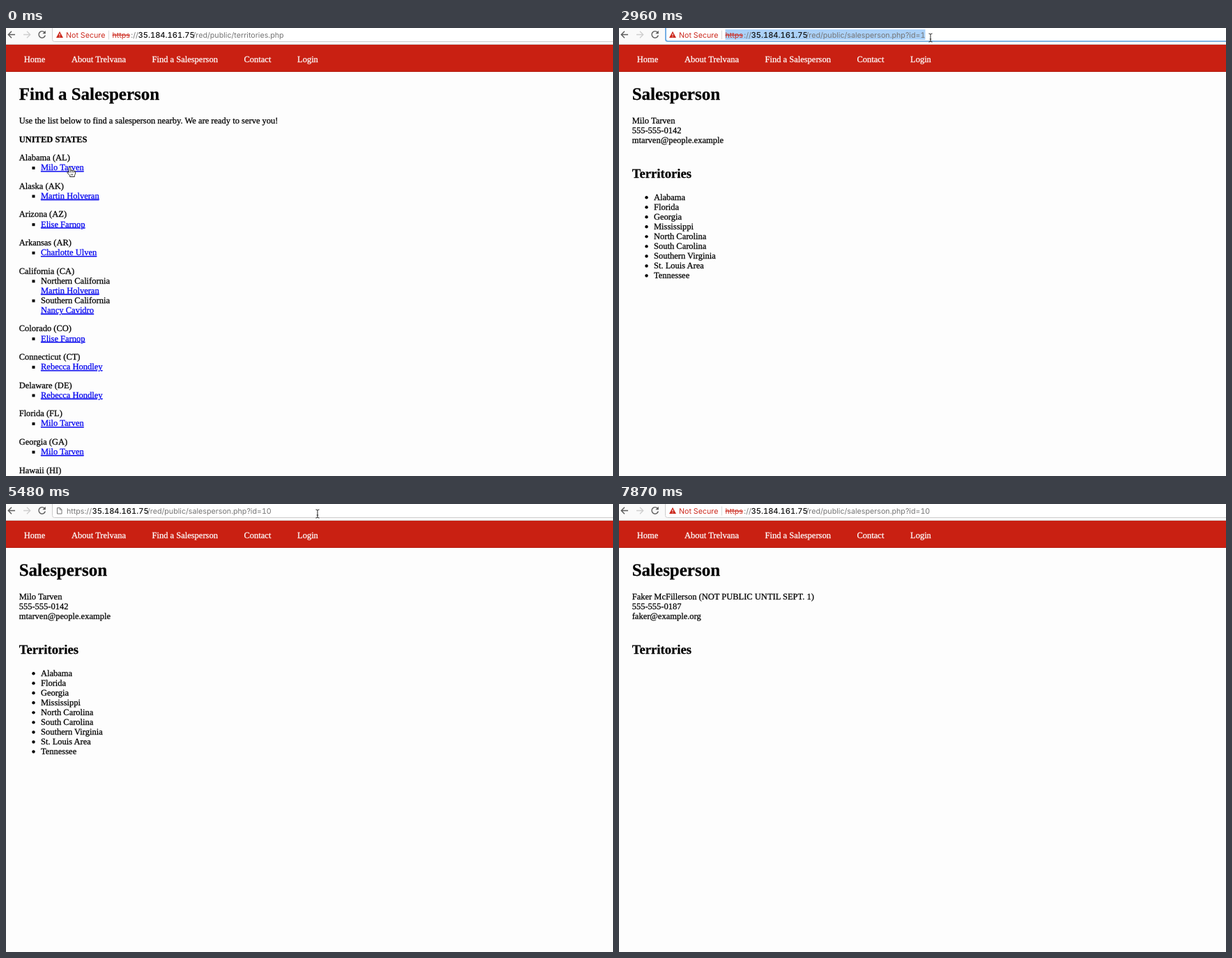
These frames come from a looping animation (871 px wide and 643 px high, 9.4 s). An HTML page:

```html
<!DOCTYPE html>
<html lang="en">
<head>
<meta charset="utf-8">
<title>Find a Salesperson</title>
<style>
  html, body { margin: 0; width: 100%; height: 100%; overflow: hidden; background: #fdfdfd; }
  svg { display: block; }
  text { white-space: pre; text-rendering: geometricPrecision; }
  .page text { font: 12.5px "Liberation Serif", "Times New Roman", serif; stroke: #000; stroke-width: .25; }
  .page .h1 { font-size: 25px; font-weight: bold; }
  .page .h2 { font-size: 18.7px; font-weight: bold; }
  .page .strong { font-weight: bold; }
  .page .link { fill: #0000ee; stroke: #0000ee; text-decoration: underline; }
  .page .nav { fill: #fff; stroke: #fff; }
  .bar text { font: 10.7px Inter, sans-serif; font-feature-settings: "tnum"; fill: #747474; }
  .bar .host { font-size: 11.15px; font-weight: 500; fill: #111; }
  .bar .bad { fill: #cc2a1e; }
  .bar .struck { text-decoration: line-through; }
  .bar .match { font-size: 11.28px; font-weight: 700; fill: #2b5fd9; }
  .bar .dark { font-size: 10.8px; fill: #111; }
</style>
</head>
<body>
<svg id="stage" width="871" height="643" viewBox="0 0 871 643">
  <defs>
    <g id="sheet" fill="#fff" stroke="#757575">
      <path d="M73.5 5.5h4l2.5 2.5v6h-6.5zM77.3 5.5v2.7H80"/>
    </g>
  </defs>

  <rect width="871" height="643" fill="#fdfdfd"/>
  <g class="page">
    <rect y="24" width="871" height="39" fill="#c92012"/>
    <rect y="62" width="871" height="1" fill="#b31c10"/>
    <g id="nav"></g>
    <g id="list"></g>
    <g id="first"></g>
    <g id="second"></g>
  </g>

  <g class="bar">
    <rect width="871" height="24" fill="#fafafa"/>
    <rect y="23" width="871" height="1" fill="#d2d2d2"/>
    <g fill="none" stroke-width="1.4">
      <path d="M13 9.5H3.5M8 4.8 3.3 9.5 8 14.2" stroke="#5c5c5c"/>
      <path d="M25 9.5h9.5M30 4.8l4.7 4.7-4.7 4.7" stroke="#cfcfcf"/>
      <path d="M55.3 6.3A4.7 4.7 0 1 0 56.3 10.5" stroke="#5c5c5c"/>
      <path d="M56.8 3.8v4.4h-4.4z" fill="#5c5c5c"/>
    </g>
    <rect x="66.5" y="-5" width="820" height="24.5" rx="3" fill="#fff" stroke="#cdcdcd"/>
    <rect id="ring" x="67" y="-5" width="820" height="24" rx="3" fill="none" stroke="#62a5e4" stroke-width="1.7"/>
    <rect id="selection" x="152.5" y="2" width="287" height="15" fill="#abd1f8"/>

    <g id="secure">
      <path d="M77 4.7 82 14H72z" fill="#cc2a1e"/>
      <path d="M77 8v3M77 12v1" stroke="#fff"/>
      <svg id="chip" x="86" width="58" height="22">
        <text class="bad" y="13.6">Not Secure</text>
      </svg>
      <g id="address">
        <path d="M147.5 3.5v13" stroke="#d8d8d8"/>
        <text class="bad struck" x="152.5" y="13.6">https</text>
        <text x="179.3" y="13.6">://</text>
        <text class="host" x="189.5" y="13.6">35.184.161.75</text>
        <text id="path" x="268.5" y="13.6"></text>
      </g>
    </g>

    <g id="editing">
      <use href="#sheet"/>
      <text x="87" y="13.6">https://</text>
      <text class="host" x="123.5" y="13.6">35.184.161.75</text>
      <text x="203" y="13.6">/red/public/salesperson.php?id=10</text>
    </g>

    <g id="dropdown">
      <rect y="23" width="871" height="49" fill="#fdfdfd"/>
      <path d="M0 23.5h871" stroke="#dcdcdc"/>
      <rect y="28" width="871" height="19" fill="#e8e8e8"/>
      <path d="M0 71.5h871" stroke="#d9d9d9"/>
      <use href="#sheet" y="28"/>
      <text class="match" x="87" y="41.6">https://35.184.161.75/red/public/salesperson.php?id=10</text>
      <text x="408.5" y="41.6">- Salesperson: Faker McFillerson (NOT PUBLIC UNTIL SEPT. 1)</text>
      <path d="M78.3 58.8 81.5 62" stroke="#707070" stroke-width="1.5"/>
      <circle cx="75.8" cy="56.2" r="3.2" fill="none" stroke="#707070" stroke-width="1.2"/>
      <text class="dark" x="87" y="61.4">https://35.184.161.75/red/public/salesperson.php?id=10</text>
      <text x="384.5" y="61.4">- Qondra Search</text>
    </g>
    <rect id="caret" y="3" width="1" height="14" fill="#111"/>
  </g>

  <g id="pointer">
    <path id="arrow" d="M0 0v11.4l2.6-2.3 1.9 4.2 2-.9-1.9-4.1h3.6z" fill="#000" stroke="#fff" stroke-width=".9"/>
    <path id="beam" d="M-2.5-6Q0-6 0-4.5Q0-6 2.5-6M0-4.5v9M-2.5 6Q0 6 0 4.5Q0 6 2.5 6M-1.2 2h2.4" fill="none" stroke="#222"/>
    <path id="hand" d="M-1.3 8V1.2Q0-.7 1.3 1.2V5Q2.8 3.8 3.7 5.3Q5 4.3 6 5.8Q8.2 5 8.2 7.5Q8.2 10.5 6.8 12V14H.2V12.3Q-2.8 9.7-3.8 7.3Q-2.8 5.6-1.3 8zM1.3 5v3M3.7 5.3V8M6 5.8V8M2 10v2M4 10v2" fill="#fff" stroke="#111" stroke-width=".9"/>
  </g>
</svg>

<script>
const LOOP = 9400, LINE = 14.04, GAP = 12.55;
const byId = id => document.getElementById(id);

function add(parent, tag, attrs, content = "") {
  const node = document.createElementNS("http://www.w3.org/2000/svg", tag);
  for (const key in attrs) node.setAttribute(key, attrs[key]);
  node.textContent = content;
  byId(parent).append(node);
}
const write = (parent, x, y, content, style = "") =>
  add(parent, "text", { x, y, class: style }, content);

const menu = { 25.7: "Home", 94: "About Trelvana", 209.5: "Find a Salesperson", 341.5: "Contact", 418: "Login" };
for (const x in menu) write("nav", x, 48.8, menu[x], "nav");

const [milo, martin, elise, rebecca] = ["Milo Tarven", "Martin Holveran", "Elise Farnop", "Rebecca Hondley"];
const states = [
  ["Alabama (AL)", [milo]],
  ["Alaska (AK)", [martin]],
  ["Arizona (AZ)", [elise]],
  ["Arkansas (AR)", ["Charlotte Ulven"]],
  ["California (CA)", [martin, "Northern California"], ["Nancy Cavidro", "Southern California"]],
  ["Colorado (CO)", [elise]],
  ["Connecticut (CT)", [rebecca]],
  ["Delaware (DE)", [rebecca]],
  ["Florida (FL)", [milo]],
  ["Georgia (GA)", [milo]],
  ["Hawaii (HI)"]
];

function buildList() {
  write("list", 18.7, 102.6, "Find a Salesperson", "h1");
  write("list", 18.7, 137, "Use the list below to find a salesperson nearby. We are ready to serve you!");
  write("list", 18.7, 163.5, "UNITED STATES", "strong");
  let y = 190.2;
  for (const [state, ...entries] of states) {
    write("list", 18.7, y, state);
    for (const [person, region] of entries) {
      y += LINE;
      add("list", "rect", { x: 37.5, y: y - 5.3, width: 4, height: 4 });
      if (region) {
        write("list", 50, y, region);
        y += LINE;
      }
      write("list", 50, y, person, "link");
    }
    y += LINE + GAP;
  }
}

function buildPerson(parent, details, territories) {
  write(parent, 18.7, 102.6, "Salesperson", "h1");
  details.forEach((line, i) => write(parent, 18.7, 137 + i * LINE, line));
  write(parent, 18.7, 215, "Territories", "h2");
  territories.forEach((name, i) => {
    const y = 246.6 + i * LINE;
    add(parent, "circle", { cx: 39.5, cy: y - 3.4, r: 2.2 });
    write(parent, 50, y, name);
  });
}

buildList();
buildPerson("first", [milo, "555-555-0142", "mtarven@people.example"],
  ["Alabama", "Florida", "Georgia", "Mississippi", "North Carolina", "South Carolina",
   "Southern Virginia", "St. Louis Area", "Tennessee"]);
buildPerson("second", ["Faker McFillerson (NOT PUBLIC UNTIL SEPT. 1)", "555-555-0187", "faker@example.org"], []);

// Each entry changes only the listed properties and holds until the next one.
const timeline = [
  [0, { page: "list", path: "territories.php", cursor: "hand", at: [91.5, 199.5], mode: "secure", shift: 0 }],
  [570, { path: "salesperson.php?id=1" }],
  [870, { page: "first" }],
  [1370, { cursor: "arrow", at: [92, 197] }],
  [1520, { at: [122, 194] }],
  [1640, { at: [198, 184] }],
  [1760, { at: [265, 171] }],
  [1880, { at: [320, 140] }],
  [2000, { at: [368, 98] }],
  [2110, { at: [408, 58] }],
  [2230, { at: [436, 28] }],
  [2340, { at: [447, 14], cursor: "beam" }],
  [2460, { ring: true }],
  [2580, { selection: true }],
  [3200, { selection: false, caret: 439 }],
  [3800, { caret: 0 }],
  [4400, { caret: 439 }],
  [4520, { cursor: "arrow", at: [447, 13] }],
  [4640, { mode: "editing", dropdown: true, caret: 381 }],
  [5240, { caret: 0 }],
  [5360, { cursor: "beam", at: [447, 14] }],
  [5480, { dropdown: false, ring: false }],
  [5590, { mode: "secure", shift: -24, page: "second", path: "salesperson.php?id=10" }],
  [5710, { shift: -2.5 }],
  [5830, { shift: 0 }],
  [5940, { at: [447, 24] }],
  [6060, { cursor: "arrow", at: [448, 41] }],
  [6900, { at: [580, 360] }],
  [7010, { at: [661, 584] }],
  [7280, { at: [672, 588] }],
  [7400, { at: [704, 598] }],
  [7520, { at: [752, 612] }],
  [7630, { at: [800, 626] }],
  [7750, { at: [830, 637] }],
  [7870, { cursor: "" }]
];

const show = (id, on) => byId(id).style.display = on ? "" : "none";

function render(time) {
  const now = {};
  for (const [start, change] of timeline) if (start <= time) Object.assign(now, change);

  for (const id of ["list", "first", "second"]) show(id, now.page === id);
  for (const id of ["hand", "arrow", "beam"]) show(id, now.cursor === id);
  for (const id of ["secure", "editing"]) show(id, now.mode === id);
  for (const id of ["ring", "selection", "dropdown", "caret"]) show(id, now[id]);

  byId("path").textContent = "/red/public/" + now.path;
  byId("caret").setAttribute("x", now.caret || 0);
  byId("chip").setAttribute("width", 58 + now.shift);
  byId("address").setAttribute("transform", `translate(${now.shift})`);
  byId("pointer").setAttribute("transform", `translate(${now.at})`);
}

function tick() {
  render(performance.now() % LOOP);
  requestAnimationFrame(tick);
}
tick();
</script>
</body>
</html>
```
